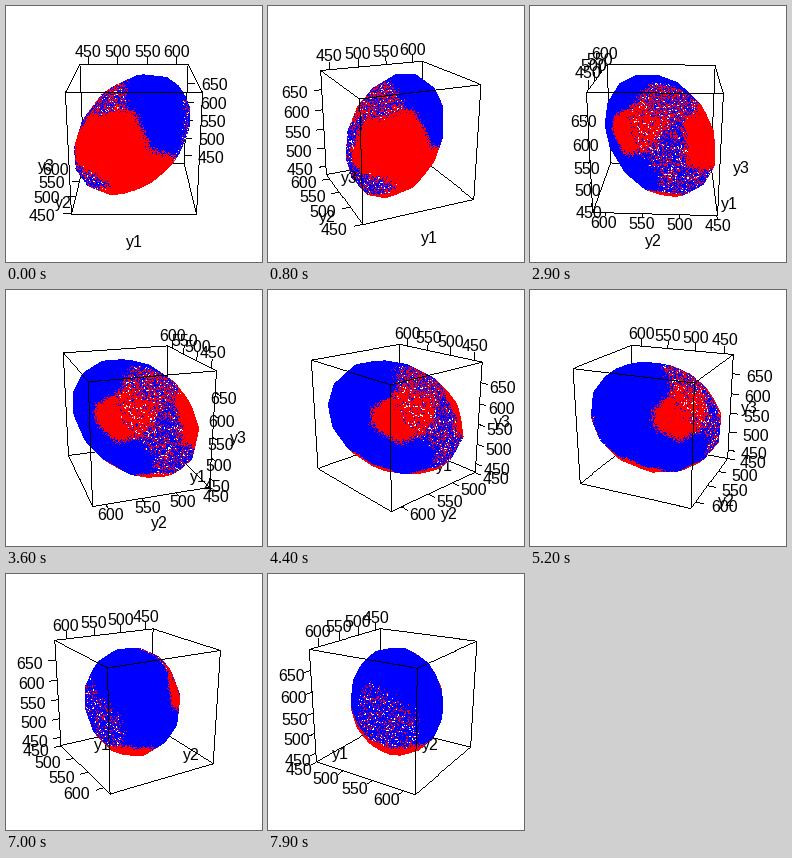
Animation, 256 px wide and 256 px high, one loop 8000 ms. Source, as a matplotlib script:

```python
import numpy as np
import matplotlib.pyplot as plt
from itertools import combinations, product
from matplotlib.animation import FuncAnimation

SIZE, FRAMES, INTERVAL, STEP = 256, 80, 100, 3
FOCAL, DIST, TILT = 477.7, 8.24, np.radians(20)
TICK, TITLE = 2 / 15, 1.29
FONT, LABEL_W, DROP = 16, 26.7, 6.8
RED, BLUE, WHITE = (255, 0, 0), (0, 0, 255), (255, 255, 255)

# position of 450, step per 50 units, number of ticks
SCALES = [(-0.835, 0.539, 4), (-0.99, 0.592, 4), (-0.8276, 0.370, 5)]

# the solid is a faceted ellipsoid with this shape matrix
SHAPE = np.array([[0.98, 0.36, 0.19],
                  [0.36, 0.93, 0.13],
                  [0.19, 0.13, 0.95]])
FACETS, FIT = 80, 0.985

# share of red -> centres of the surface regions
REGIONS = {
    1.0: [(-0.3, -0.9, 0.1), (0.2, -0.75, -0.55), (-0.8, -0.65, 0.1),
          (-0.65, 0.65, 0.2), (0.3, 0.2, -0.85), (-0.45, -0.3, -0.85)],
    0.9: [(-0.75, 0.2, 0.4)],
    0.5: [(-0.55, -0.15, 0.8)],
    0.3: [(-0.9, -0.25, 0.1), (-0.8, -0.4, -0.45)],
    0.2: [(0.9, 0.3, 0.1)],
    0.0: [(0.6, -0.5, 0.4), (0.5, 0.5, 0.6), (0.1, 0.9, 0.1), (0.3, -0.2, 0.9),
          (0, 0.65, 0.8), (-0.4, 0.8, -0.25), (-0.7, 0.25, -0.5)],
}
CENTRES = np.array(sum(REGIONS.values(), []))
SHARES = np.repeat(list(REGIONS), [len(v) for v in REGIONS.values()])


def sphere_dirs(n):
    """Evenly spread directions on a golden spiral."""
    i = np.arange(n) + 0.5
    z, a = 1 - 2 * i / n, np.pi * (1 + 5 ** 0.5) * i
    r = np.sqrt(1 - z * z)
    return np.column_stack([r * np.cos(a), r * np.sin(a), z])


# tangent planes n.p <= h of the ellipsoid
NORMALS = sphere_dirs(FACETS) @ np.linalg.inv(np.linalg.cholesky(SHAPE))
OFFSETS = np.full(FACETS, FIT)

X0, X1, Y0, Y1 = 46, 206, 56, 200
COLS, ROWS = [g.ravel() for g in np.meshgrid(np.arange(X0, X1), np.arange(Y0, Y1))]
RAYS = np.column_stack([(COLS + 0.5 - SIZE / 2) / FOCAL,
                        (SIZE / 2 - ROWS - 0.5) / FOCAL, -np.ones(len(COLS))])


def view(deg):
    c, s = np.cos(np.radians(deg)), np.sin(np.radians(deg))
    C, S = np.cos(TILT), np.sin(TILT)
    return np.array([[c, -s, 0], [s * S, c * S, C], [-s * C, -c * C, S]])


def project(m, p):
    x, y, z = m @ np.asarray(p, float)
    k = FOCAL / (DIST - z)
    return SIZE / 2 + k * x, SIZE / 2 - k * y, z


def cast(m):
    """First surface point along the ray of each pixel, and a hit mask."""
    eye, d = m.T @ (0, 0, DIST), RAYS @ m
    slope = d @ NORMALS.T
    t = (OFFSETS - NORMALS @ eye) / slope
    near = np.where(slope < 0, t, -np.inf).max(axis=1)
    far = np.where(slope > 0, t, np.inf).min(axis=1)
    return eye + near[:, None] * d, far > near


def noise(p, salt):
    v = np.floor(p * 57) @ (12.9898, 78.233, 37.719) + salt
    return np.modf(np.abs(np.sin(v) * 43758.5453))[0]


def paint(p):
    """Colour by nearest region, with grainy borders and mixed areas."""
    grain = np.column_stack([noise(p, salt) for salt in (1, 2, 3)]) - 0.5
    q = p + 0.12 * grain
    near = ((CENTRES ** 2).sum(axis=1) - 2 * q @ CENTRES.T).argmin(axis=1)
    share = SHARES[near]
    rgb = np.where((noise(p, 0) < share)[:, None], RED, BLUE)
    rgb[(share > 0) & (share < 1) & (noise(p, 5) < 0.06)] = WHITE
    return rgb


def draw_line(img, x0, y0, x1, y1):
    n = int(max(abs(x1 - x0), abs(y1 - y0))) + 1
    xs, ys = np.linspace(x0, x1, n + 1), np.linspace(y0, y1, n + 1)
    img[ys.astype(int), xs.astype(int)] = (0, 0, 0, 255)


def render(m, lines):
    img = np.zeros((SIZE, SIZE, 4), np.uint8)
    segs = [(project(m, p), project(m, q)) for p, q in lines]
    segs.sort(key=lambda s: s[0][2] + s[1][2])
    split = sum(a[2] + b[2] <= 0 for a, b in segs)
    for a, b in segs[:split]:
        draw_line(img, *a[:2], *b[:2])
    p, hit = cast(m)
    img[ROWS[hit], COLS[hit], :3] = paint(p[hit])
    img[ROWS[hit], COLS[hit], 3] = 255
    for a, b in segs[split:]:
        draw_line(img, *a[:2], *b[:2])
    return img


CORNERS = list(product((-1, 1), repeat=3))
EDGES = [(a, b) for a, b in combinations(CORNERS, 2)
         if sum(i != j for i, j in zip(a, b)) == 1]


def axis_edges(deg):
    """For each axis: a point on its labelled edge and the tick direction."""
    side = -1 if deg <= 180 else 1
    back = 1 if deg <= 90 else -1
    side_z = 1 if deg == 0 else side
    up = (0, 0, 1)
    second = ((1, 0, 1), up) if deg == 180 else ((side, 0, -1), (side, 0, 0))
    return ((0, back, 1), up), second, ((side_z, back, 0), (side_z, 0, 0))


fig = plt.figure(figsize=(SIZE / 100, SIZE / 100), dpi=100, facecolor="white")
ax = fig.add_axes([0, 0, 1, 1])
ax.axis("off")
picture = ax.imshow(np.zeros((SIZE, SIZE, 4), np.uint8), zorder=2, aspect="auto",
                    extent=(0, SIZE, SIZE, 0), interpolation="nearest")


def label(s):
    return ax.text(0, 0, s, family="Liberation Sans", fontsize=FONT * 0.72,
                   ha="center", va="baseline", color="black")


ticks = [[label(str(450 + 50 * i)) for i in range(n)] for _, _, n in SCALES]
titles = [label(f"y{i + 1}") for i in range(3)]


def place(text, m, p, shift=0):
    x, y, z = project(m, p)
    text.set_position((x + shift, y + DROP))
    text.set_zorder(3 if z > 0 else 1)


def update(k):
    m = view(k * STEP)
    lines = list(EDGES)
    for a, (base, out) in enumerate(axis_edges(k * STEP)):
        out = np.array(out, float)
        start, step, _ = SCALES[a]
        # labels lean away from the box as the tick turns sideways
        lean = (m @ out)[0]
        shift = lean / 2 * LABEL_W if abs(lean) > 1 / 3 else 0
        for i, text in enumerate(ticks[a]):
            p = np.array(base, float)
            p[a] = start + i * step
            lines.append((p, p + TICK * out))
            place(text, m, p + 2 * TICK * out, shift)
    for a, text in enumerate(titles):
        p = np.full(3, -TITLE)
        p[a] = 0
        place(text, m, p)
    picture.set_data(render(m, lines))
    return [picture, *titles, *sum(ticks, [])]


anim = FuncAnimation(fig, update, frames=FRAMES, interval=INTERVAL,
                     repeat=True, repeat_delay=0)
plt.show()
```
